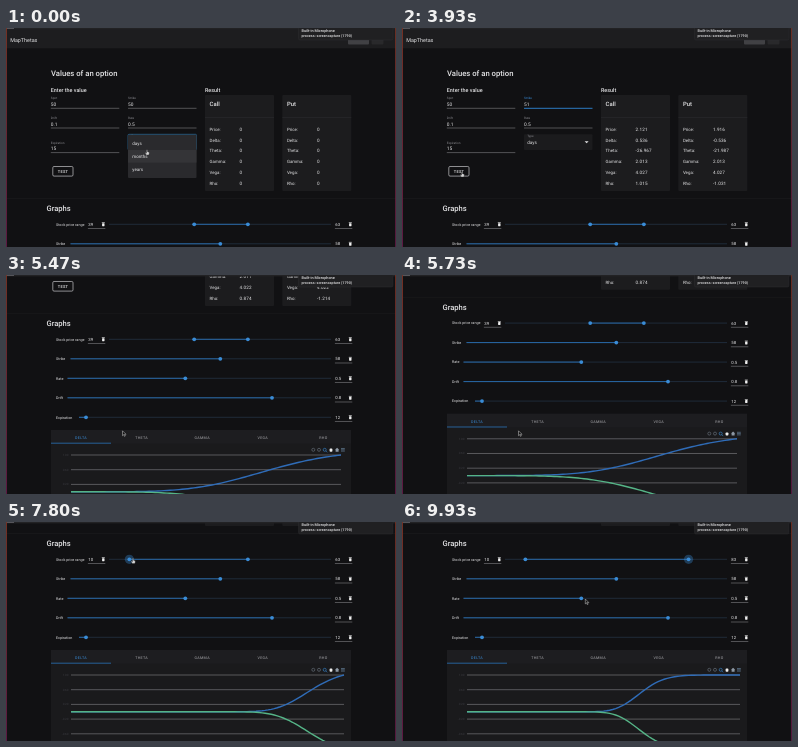
An HTML page that plays this animation: 390x219 px, repeating every 10 s.

```html
<!DOCTYPE html>
<html lang="en">
<head>
<meta charset="utf-8">
<title>Option values</title>
<style>
  html, body { margin: 0; width: 100%; height: 100%; overflow: hidden; background: #111113; }
  svg { display: block; width: 100vw; height: 100vh; }
  text { font-family: Roboto, Arial, sans-serif; fill: #e4e4e6; text-rendering: geometricPrecision; white-space: pre; }
  .dim { fill: #8b8b90; }
  .line { stroke: #7e7e82; stroke-width: .6; }
  .focus { stroke: #2f86d6; stroke-width: .9; }
</style>
</head>
<body>
<svg id="stage" viewBox="0 0 390 219" preserveAspectRatio="none"></svg>
<script>
const LOOP = 10000;
const BLUE = "#3a8cd6", DEEP = "#2868a6";

const rect = (x, y, w, h, fill, more = "") =>
  `<rect x="${x}" y="${y}" width="${w}" height="${h}" fill="${fill}" ${more}/>`;
const line = (x1, x2, y, more = 'class="line"') =>
  `<path d="M${x1} ${y}H${x2}" fill="none" ${more}/>`;
const text = (x, y, size, str, more = "") =>
  `<text x="${x}" y="${y}" font-size="${size}" ${more}>${str}</text>`;
const group = (id, body) => `<g id="${id}">${body}</g>`;

function field(x, y, label, value, id) {
  return text(x, y - 6.6, 3.1, label, `class="dim" id="${id}Label"`) +
    text(x, y, 4.8, value, `id="${id}"`) +
    line(x, x + 68.5, y + 2.3, `class="line" id="${id}Line"`);
}

const greeks = ["Price", "Delta", "Theta", "Gamma", "Vega", "Rho"];
const results = [
  [Array(6).fill("0"), Array(6).fill("0")],
  [["2.121", "0.536", "-26.967", "2.013", "4.027", "1.015"],
   ["1.916", "-0.536", "-21.987", "2.013", "4.027", "-1.031"]],
  [["1.666", "0.459", "-26.592", "2.011", "4.022", "0.874"],
   ["2.457", "-0.459", "-21.513", "2.011", "4.022", "-1.214"]]
];

function card(x, title, n) {
  const rows = greeks.map((g, i) => {
    const y = 102.6 + i * 10.9;
    return text(x + 4.6, y, 4.4, g + ":") +
      text(x + 34.6, y, 4.6, "0", `id="res${n}${i}" letter-spacing=".1"`);
  });
  return rect(x, 67, 69, 96, "#1c1c1e", 'rx="1"') +
    text(x + 4.6, 78, 5.9, title, 'font-weight="500"') +
    line(x, x + 69, 89.5, 'stroke="#2b2b2e" stroke-width=".6"') + rows.join("");
}

const bin = (x, y) => rect(x - 1.2, y - 1.1, 2.4, 3, "#f0f0f0", 'rx=".4"') +
  rect(x - 1.5, y - 1.9, 3, .6, "#f0f0f0");

const valueBox = (x, y, value, id) => text(x, y + 1.6, 4.3, value, `id="${id}"`) +
  bin(x + 15, y) + line(x - .4, x + 17, y + 4.2);

const rail = (x, y) => line(x, 325, y, 'stroke="#24364a" stroke-width=".7"');
const thumb = (x, y, id = "") => `<circle id="${id}" cx="${x}" cy="${y}" r="1.9" fill="${BLUE}"/>`;

function slider(y, label, x0, x, value) {
  return text(50, y + 1.3, 3.7, label) + rail(x0, y) +
    line(x0, x, y, `stroke="${DEEP}" stroke-width="1"`) + thumb(x, y) +
    valueBox(329.3, y, value, label);
}

function toolbar(y) {
  const stroke = (d, c) => `<path d="${d}" fill="none" stroke="${c}" stroke-width=".6"/>`;
  const ring = (x, c) => `<circle cx="${x}" cy="${y}" r="1.5" fill="none" stroke="${c}" stroke-width=".6"/>`;
  return ring(307.3, "#6e7883") + ring(313, "#6e7883") + ring(318.7, BLUE) +
    stroke(`M319.8 ${y + 1.1}l1.4 1.4`, BLUE) +
    rect(323.6, y - 1.2, 2.8, 3.2, "#eeeeee", 'rx=".8"') +
    `<path d="M329 ${y}l2.1 -2l2.1 2h-.6v1.9h-3v-1.9z" fill="#8d98a4"/>` +
    [-1.3, 0, 1.3].map(d => line(335, 338.8, y + d, 'stroke="#6e8ba8" stroke-width=".6"')).join("");
}

const ROW = 19.5, FIRST = 196.3, GRID = 14.7, TOP = 312, ZERO = 348.8, LEFT = 65;

function chart() {
  const tabs = ["DELTA", "THETA", "GAMMA", "VEGA", "RHO"].map((s, i) =>
    text(75 + i * 60.6, 296, 3.7, s,
      `text-anchor="middle" letter-spacing=".3" style="fill:${i ? "#a6a6aa" : BLUE}"`));
  const labels = ["1.00", "0.60", "0.20", "-0.20", "-0.60", "-1.00"].map((s, i) =>
    text(62.5, TOP + i * GRID + 1, 3, s, 'text-anchor="end" style="fill:#3c3c40"'));
  return rect(45, 287, 300, 110, "#1a1a1c") + rect(45, 287, 300, 13.5, "#1d1d20") + tabs.join("") +
    line(45, 105, 300.2, `stroke="${DEEP}" stroke-width=".9"`) + toolbar(306.8) + labels.join("") +
    '<path id="grid" stroke="#68686b" stroke-width=".8"/>' +
    '<path id="callCurve" fill="none" stroke="#2f6cb8" stroke-width="1.4"/>' +
    '<path id="putCurve" fill="none" stroke="#55b487" stroke-width="1.4"/>';
}

const menu = rect(122, 107, 68.5, 43, "#2a2a2d", 'rx="1"') +
  rect(122, 122, 68.5, 12.6, "#343437") +
  ["days", "months", "years"].map((s, i) => text(126.3, 116.9 + i * 13, 4.5, s)).join("");

const page =
  rect(0, 0, 390, 20.3, "#1d1d1f") +
  text(4.2, 13.7, 5.4, "MapThetas") +
  rect(342, 9, 21, 7.4, "#414144", 'rx="1"') + rect(365.5, 9, 12, 7.4, "#29292b", 'rx="1"') +
  text(45, 47.8, 7.7, "Values of an option", 'font-weight="500"') +
  text(44.8, 64, 5.4, "Enter the value", 'font-weight="500"') +
  text(199, 64, 5.4, "Result", 'font-weight="500"') +
  field(44.8, 78, "Spot", "50", "spot") + field(122, 78, "Strike", "50", "strike") +
  field(44.8, 97.7, "Drift", "0.1", "drift") + field(122, 97.7, "Rate", "0.5", "rate") +
  field(44.8, 122.3, "Expiration", "15", "expiry") +
  rect(122, 106.3, 68.5, 15.6, "#1b1b1d", 'id="select" rx="1" stroke-width=".7"') +
  text(125.2, 109, 3, "Type", 'class="dim"') + text(125.2, 116, 4.6, "days") +
  '<path d="M182.6 113.2h4l-2 2z" fill="#e4e4e6"/>' + group("menu", menu) +
  rect(46.8, 138.5, 20.2, 9.6, "#5c5c60", 'id="button" rx="1.2" stroke="#c4c4c7" stroke-width=".7"') +
  text(57, 144.8, 4, "TEST", 'text-anchor="middle" letter-spacing=".25" font-weight="500"') +
  card(199, "Call", 0) + card(276.3, "Put", 1) +
  line(0, 390, 170.5, 'stroke="#1a1a1c" stroke-width=".7"') +
  text(40.5, 182.8, 7.6, "Graphs", 'font-weight="500"') +
  text(50, FIRST + 1.3, 3.7, "Stock price range") + rail(103, FIRST) +
  `<path id="span" stroke="${DEEP}" stroke-width="1"/>` +
  `<circle id="halo" r="4.6" cy="${FIRST}" fill="${BLUE}" opacity=".35"/>` +
  thumb(0, FIRST, "thumbLow") + thumb(0, FIRST, "thumbHigh") +
  valueBox(82.3, FIRST, "39", "low") + valueBox(329.3, FIRST, "63", "high") +
  slider(FIRST + ROW, "Strike", 64.5, 214.3, "58") +
  slider(FIRST + 2 * ROW, "Rate", 61.5, 179.3, "0.5") +
  slider(FIRST + 3 * ROW, "Drift", 61.5, 266, "0.8") +
  slider(FIRST + 4 * ROW, "Expiration", 73, 80, "12") + chart();

const overlay =
  rect(0, 0, 390, 1.4, "#222224") + rect(0, 0, 8, 1, "#55555a") +
  rect(0, 0, .9, 219, "url(#edge)") + rect(389.2, 0, .8, 219, "url(#edge)") +
  rect(292.5, -4, 94.5, 16, "#202022", 'rx="1.5" stroke="#303033" stroke-width=".4"') +
  text(295.5, 4.2, 3.8, "Built-in Microphone", 'font-weight="500"') +
  text(295.5, 9, 3.7, "process: screencapture (1790)", 'font-weight="500"');

const pointer =
  '<path id="arrow" d="M0 0V4.9L1.2 3.8L2 5.6L2.8 5.2L2 3.5H3.5Z" fill="#111" stroke="#ccc" stroke-width=".5"/>' +
  '<path id="hand" d="M-.6 0Q0 -.6 .6 0V2L2.6 2.6V4.6L1.9 5.8H-.9L-2.1 3.6L-1.5 3L-.6 3.7Z" fill="#d8d8d8" stroke="#222" stroke-width=".4" transform="scale(.85)"/>';

document.getElementById("stage").innerHTML =
  '<defs><linearGradient id="edge" x2="0" y2="1"><stop stop-color="#7d3324"/>' +
  '<stop offset="1" stop-color="#641a48"/></linearGradient></defs>' +
  group("page", page) + overlay + group("cursor", pointer);

const $ = id => document.getElementById(id);
const set = (id, attr, value) => $(id).setAttribute(attr, value);
const show = (id, on) => set(id, "visibility", on ? "visible" : "hidden");
const ease = p => p * p * (3 - 2 * p);

// steps: [time, value, value...], eased between neighbours
function at(steps, t) {
  const i = steps.findIndex(s => s[0] > t);
  if (i === 0) return steps[0].slice(1);
  if (i < 0) return steps[steps.length - 1].slice(1);
  const a = steps[i - 1], b = steps[i];
  const p = ease((t - a[0]) / (b[0] - a[0]));
  return a.slice(1).map((v, k) => v + (b[k + 1] - v) * p);
}

const path = [
  [70, 141, 122], [380, 131, 114], [500, 131, 114], [1070, 60.5, 144.5], [1870, 60.5, 144.5],
  [2400, 186, 74.5], [3000, 186, 74.5], [3800, 60, 144], [4600, 60, 144], [4730, 116.5, 155.8],
  [6000, 116.5, 155.8], [6200, 165.3, 93], [6520, 189, 37], [6600, 189, 37], [7450, 127, 36.5],
  [7850, 127, 36.5], [8200, 242, 37], [8300, 242, 37], [9050, 287, 37], [9130, 287, 40],
  [9750, 183.3, 77]
];
const scrollSteps = [[4930, 0], [5200, 58], [5470, 132], [5930, 159]];
const lowSteps = [[6600, 39], [7450, 10]];
const highSteps = [[8300, 63], [9050, 83]];

const priceX = v => 101 + 2.236 * v;

// option delta for the slider values, logistic form of the normal distribution
const STRIKE = 58, SIGMA = .5, DRIFT = .8, YEARS = 12 / 365;
function delta(s) {
  const d1 = (Math.log(s / STRIKE) + (DRIFT + SIGMA ** 2 / 2) * YEARS) / (SIGMA * Math.sqrt(YEARS));
  return 1 / (1 + Math.exp(-1.5976 * d1 - .07056 * d1 ** 3));
}

function curve(low, high, right, sign) {
  const n = 90, top = delta(high);
  let d = "";
  for (let i = 0; i <= n; i++) {
    const y = ZERO - sign * 36.8 * delta(low + (high - low) * i / n) / top;
    d += (i ? "L" : "M") + (LEFT + (right - LEFT) * i / n).toFixed(2) + " " + y.toFixed(2);
  }
  return d;
}

function drawChart(low, high) {
  const right = low < 39 ? 338 : 335;
  set("grid", "d", [0, 1, 2, 3, 4, 5].map(i => `M${LEFT} ${TOP + i * GRID}H${right}`).join(""));
  set("callCurve", "d", curve(low, high, right, 1));
  set("putCurve", "d", curve(low, high, right, -1));
}

let shown = -1;
function showResults(n) {
  if (n === shown) return;
  shown = n;
  results[n].forEach((col, c) => col.forEach((v, i) => { $(`res${c}${i}`).textContent = v; }));
}

function draw(t) {
  const [x, y] = at(path, t);
  set("cursor", "transform", `translate(${x} ${y})`);
  const hand = t < 1900 || (t > 3700 && t < 4650) || (t > 6480 && t < 9150);
  show("hand", hand);
  show("arrow", !hand);

  set("page", "transform", `translate(0 ${-at(scrollSteps, t)[0]})`);
  show("menu", t < 480);
  set("select", "stroke", t < 2420 ? "#2b6f9e" : "none");

  const pressed = (t > 1130 && t < 1530) || (t > 4070 && t < 4270);
  set("button", "fill-opacity", pressed ? 1 : 0);
  showResults(t < 1200 ? 0 : t < 4140 ? 1 : 2);

  const focus = t >= 2420 && t < 4070;
  set("strikeLine", "class", focus ? "focus" : "line");
  $("strikeLabel").style.fill = focus ? BLUE : "";
  $("strike").textContent = t < 2600 ? "50" : "51";

  const low = at(lowSteps, t)[0], high = at(highSteps, t)[0];
  const a = priceX(low), b = priceX(high);
  set("thumbLow", "cx", a);
  set("thumbHigh", "cx", b);
  set("span", "d", `M${a} ${FIRST}H${b}`);
  $("low").textContent = Math.round(low);
  $("high").textContent = Math.round(high);
  show("halo", t > 6520);
  set("halo", "cx", t < 8200 ? a : b);

  // the chart trails the slider
  drawChart(at(lowSteps, t - 250)[0], at(highSteps, t - 250)[0]);
}

const start = performance.now();
function tick() {
  draw((performance.now() - start) % LOOP);
  requestAnimationFrame(tick);
}
tick();
</script>
</body>
</html>
```
